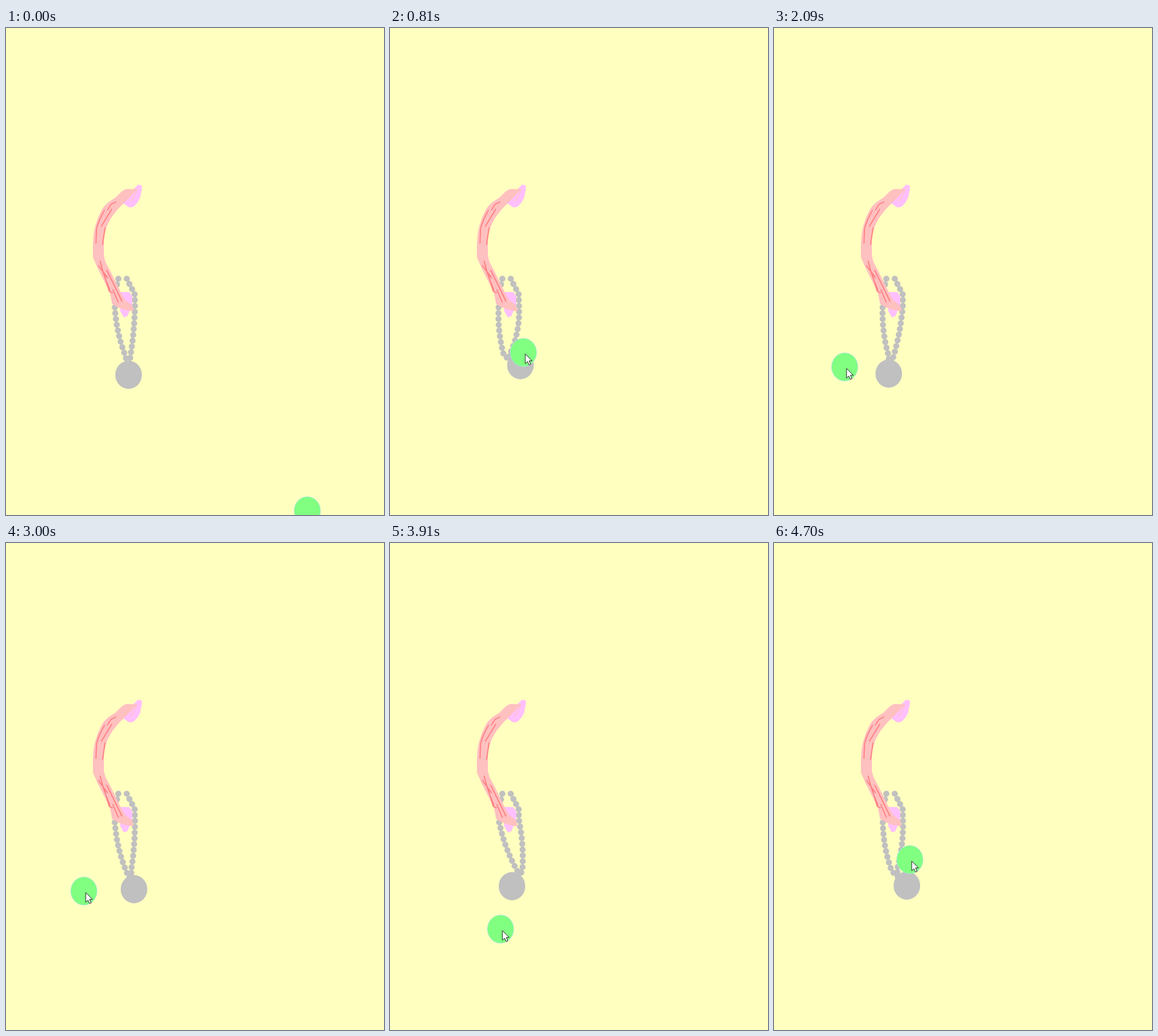
Write an HTML page that moves like this. It is 626x806 px and loops after 4.75 s.

```html
<!DOCTYPE html>
<html lang="en">
<head>
<meta charset="utf-8">
<title>Ball and chain</title>
<style>
  html, body { margin: 0; width: 100%; height: 100%; overflow: hidden; background: #ffffc0; }
  svg { display: block; width: 100%; height: 100%; }
  .chain { fill: none; stroke: #c0c0c0; stroke-width: 10; stroke-linecap: round; stroke-dasharray: .1 9.5; }
  .skin { fill: #ffc0c0; }
  .pad { fill: #ffc0ff; }
  .crease { fill: none; stroke: #ff8080; stroke-width: 1.8; stroke-linecap: round; stroke-linejoin: round; }
</style>
</head>
<body>
<svg viewBox="0 0 626 806">
  <path class="chain" id="left"/>
  <path class="chain" id="right"/>
  <ellipse id="weight" rx="22" ry="23.4" fill="#c0c0c0"/>

  <path class="pad" d="M190 437H204L209 444V458L201 477L195 479L189 468Z"/>
  <path class="pad" d="M212 266L219 259L225 261L225 267L222 281L217 290L211 296L204 297L194 290Z"/>
  <path class="skin" d="M218 266L206 267Q199 264 190 272L181 281Q165 290 159 300Q144 328 144 356V380L152 398L172 438L176 457L185 462L195 466L211 469L209 459L197 450Q189 436 183 423L170 397Q163 386 162 375V350Q164 331 173 316Q182 302 196 289L206 279Z"/>
  <path d="M217 268L207 287" fill="none" stroke="#ffc0c0" stroke-width="1.5"/>
  <path class="crease" d="M149 356L150 332Q154 317 163 302M168 301L174 292L182 288M158 328L175 300M160 358L164 331M156 386L162 408L172 434M153 393L168 413M167 401L192 452M177 433L186 454M163 408L171 436L176 438"/>

  <ellipse id="ball" rx="21.7" ry="23.2" fill="#80ff80" stroke="#a8e8d8"/>
  <path id="cursor" d="M0 0V16L3.7 12.5L6.3 18L9 17L6.5 11.3H11.3Z" fill="#fff" stroke="#222" stroke-linejoin="round"/>
</svg>
<script>
const LOOP = 4750;
const el = id => document.getElementById(id);

// Turning points of the dragged ball: time, x, y
const ballPath = [
  [0, 499, 799], [130, 527, 735], [300, 403, 573], [540, 320, 552], [810, 221, 537],
  [1250, 286, 550], [1560, 271, 599], [1790, 180, 661], [1960, 105, 605], [2090, 117, 561],
  [2450, 172, 552], [3000, 129, 576], [3910, 183, 639], [4200, 310, 590], [4700, 225, 524]
];

// Swing of the weight: time, x, y, x of the knot above it
const swing = [
  [400, 203, 574, 202], [810, 216, 558, 193], [1560, 179, 569, 188], [2090, 190, 572, 194],
  [3000, 212, 573, 203], [3910, 202, 568, 215], [4700, 220, 567, 199]
];

// Smooth interpolation without overshoot
function sample(keys, t) {
  const last = keys.length - 1;
  if (t <= keys[0][0]) return keys[0].slice(1);
  if (t >= keys[last][0]) return keys[last].slice(1);
  const i = keys.findIndex(k => k[0] > t) - 1;
  const span = keys[i + 1][0] - keys[i][0];
  const u = (t - keys[i][0]) / span;
  const slope = (n, c) => n < 0 || n >= last ? 0
    : (keys[n + 1][c] - keys[n][c]) / (keys[n + 1][0] - keys[n][0]);
  const tangent = (n, c) => {
    const a = slope(n - 1, c), b = slope(n, c);
    return a * b <= 0 ? 0 : 2 * a * b / (a + b);
  };
  return keys[i].slice(1).map((from, j) => {
    const c = j + 1, to = keys[i + 1][c];
    const ease = u * u * (3 - 2 * u);
    return from + (to - from) * ease
      + span * u * (1 - u) * ((1 - u) * tangent(i, c) - u * tangent(i + 1, c));
  });
}

function place(node, x, y) {
  node.setAttribute("transform", `translate(${x} ${y})`);
}

// A strand bows outwards from its anchor to the knot, then runs into the weight
function hang(node, top, anchorX, knotX, bow, wx, wy) {
  const bendX = (anchorX + knotX) / 2 + bow;
  node.setAttribute("d", `${top}L${anchorX} 458Q${bendX} 503 ${knotX} 543L${wx} ${wy}`);
}

const weight = el("weight"), ball = el("ball"), cursor = el("cursor");
const left = el("left"), right = el("right");

function draw(t) {
  const [wx, wy, knot] = sample(swing, t);
  const slack = 574 - wy;
  place(weight, wx, wy);
  hang(left, "M186 415L184 424L180 442", 180, knot - 4, -7, wx, wy);
  hang(right, "M200 415L204 423L213 440", 213.5, knot + 4, 3 + slack / 2, wx, wy);

  const [x, y] = sample(ballPath, t);
  place(ball, x, y);
  // The pointer runs ahead of the ball for a moment
  const lead = Math.max(0, 1 - Math.abs(t - 1560) / 140);
  place(cursor, x + 3 - 20 * lead, y + 2.5 + 33 * lead);
  cursor.style.visibility = t < 40 ? "hidden" : "visible";
}

const start = performance.now();
function tick(now) {
  draw(Math.max(0, now - start) % LOOP);
  requestAnimationFrame(tick);
}
draw(0);
requestAnimationFrame(tick);
</script>
</body>
</html>
```
